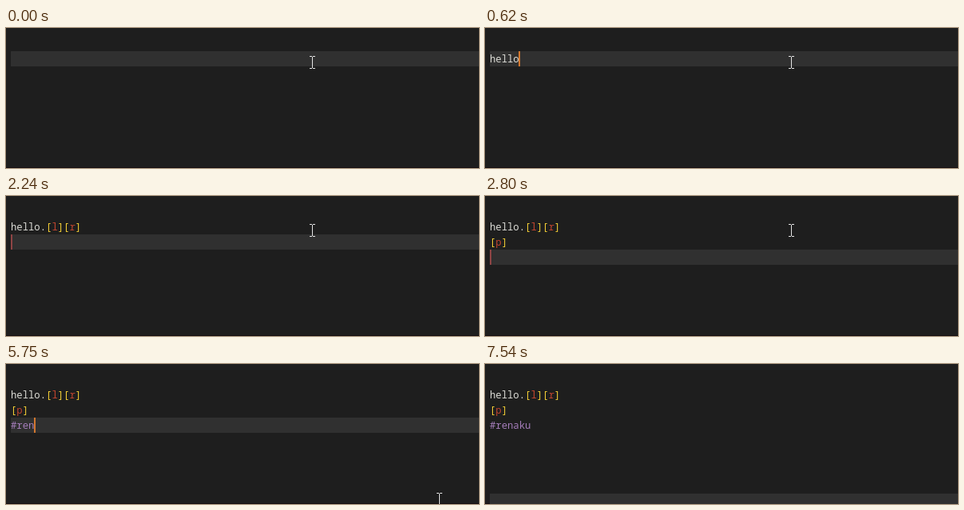
An HTML page with a canvas for the animation above (7700 ms loop, 592 by 175 pixels).

```html
<!DOCTYPE html>
<html lang="en">
<head>
<meta charset="utf-8">
<title>Editor typing</title>
<style>
html, body { margin: 0; width: 592px; height: 175px; overflow: hidden; background: #1e1e1e; }
canvas { display: block; }
</style>
</head>
<body>
<canvas id="stage" width="592" height="175"></canvas>
<script>
const ctx = document.getElementById('stage').getContext('2d');
const LOOP = 7700, LEFT = 6, TOP = 29, LINE = 19, PITCH = 7.34;
const ORANGE = '#e0812b', NAME = 'renaku';

const start = { text: ['', '', ''], row: 0, caret: false, match: null, popup: false, mouse: [383, 43] };
const steps = [];
const at = (time, change) => steps.push([time, change]);
// Replaces the text of a row and puts the caret behind it.
const type = (time, row, value, extra) => at(time, s => {
  s.text[row] = value;
  Object.assign(s, { row, caret: true, match: null, popup: false }, extra);
});
const set = (time, values) => at(time, s => Object.assign(s, values));

type(80, 0, 'h');
type(150, 0, 'he');
type(320, 0, 'hel');
type(400, 0, 'hell');
set(470, { popup: true });
type(620, 0, 'hello');
set(1080, { caret: false });
type(1400, 0, 'hello.');
type(1710, 0, 'hello.[l][r]');
set(1790, { match: [0, 9, 11] });
set(2090, { row: 1 });
set(2170, { match: null });
type(2400, 1, '[p]');
set(2480, { match: [1, 0, 2] });
type(2800, 2, '');
set(3260, { caret: false });
type(3640, 2, '#');
set(4190, { caret: false, mouse: [395, 51] });
set(4270, { mouse: [430, 70] });
set(4350, { mouse: [468, 92] });
set(4430, { mouse: [499, 110] });
type(4580, 2, '#s', { mouse: [528, 150] });
set(4670, { mouse: [542, 169] });
type(5200, 2, '#');
for (let i = 1; i <= NAME.length; i++) type(5440 + 80 * i, 2, '#' + NAME.slice(0, i));
set(6470, { caret: false });
set(6770, { caret: true, mouse: [549, 171] });
set(6850, { mouse: [555, 174] });
set(6930, { mouse: null });
set(7230, { row: 7, caret: true });
set(7540, { caret: false });

function rect(x, y, w, h, color) {
  ctx.fillStyle = color;
  ctx.fillRect(x, y, w, h);
}

function write(text, x, y, colorAt, boldAt = () => false) {
  [...text].forEach((char, i) => {
    ctx.font = `${boldAt(i) ? 'bold ' : ''}12.23px "Noto Sans Mono", monospace`;
    ctx.fillStyle = colorAt(i);
    ctx.fillText(char, x + i * PITCH, y);
  });
}

function writeCode(text, row) {
  write(text, LEFT, TOP + row * LINE + 14, i => {
    if (text[0] === '#') return '#a47dba';
    if ('[]'.includes(text[i])) return '#f5cf35';
    return text[i - 1] === '[' ? '#c3452f' : '#dcdcd6';
  });
}

function drawMatch([row, ...columns]) {
  ctx.lineWidth = 1;
  ctx.strokeStyle = '#85866f';
  for (const col of columns) {
    const x = Math.floor(LEFT + col * PITCH), y = TOP + row * LINE;
    rect(x, y, 8, LINE, '#2c382c');
    ctx.strokeRect(x + .5, y + .5, 7, LINE - 1);
  }
}

function drawIcon(x, y, color) {
  ctx.strokeStyle = color;
  ctx.lineWidth = 1.3;
  ctx.stroke(new Path2D(`M${x} ${y + 4.5}l4-4 3 2.5-4 4z
    m5 0h4m-2 0v5h2M${x + 9} ${y + 4.5}l2-2 2 2-2 2z
    m0 5l2-2 2 2-2 2z`));
}

function drawPopup() {
  rect(36, 48, 560, 42, '#454545');
  rect(37, 49, 556, 40, '#252526');
  rect(37, 49, 556, 19, '#707070');
  [['3d_hide_all', '#fff', '#fff'], ['chara_hide_all', '#c8c8c8', ORANGE]].forEach(([label, color, icon], i) => {
    const h = label.indexOf('hide');
    const hit = n => [h, h + 3, h + 6, h + 7].includes(n);
    drawIcon(40.5, 53 + i * LINE, icon);
    write(label, 59, 63 + i * LINE, n => hit(n) ? ORANGE : color, hit);
  });
}

function drawMouse([x, y]) {
  const color = '#e4e4e4';
  rect(x, y - 7, 1, 14, color);
  for (const end of [y - 8, y + 7]) {
    rect(x - 3, end, 3, 1, color);
    rect(x + 1, end, 3, 1, color);
  }
}

function draw(time) {
  const s = { ...start, text: [...start.text] };
  for (const [when, change] of steps) if (when <= time) change(s);

  rect(0, 0, 592, 175, '#1e1e1e');
  rect(0, 174, 592, 1, '#150e11');
  const y = TOP + s.row * LINE;
  rect(LEFT, y, 586, LINE, '#303030');
  if (s.match) drawMatch(s.match);
  s.text.forEach(writeCode);
  if (s.caret) {
    const col = (s.text[s.row] || '').length;
    rect(Math.floor(LEFT + col * PITCH), y, 2, LINE, col ? '#d2772f' : '#8f4444');
  }
  if (s.popup) drawPopup();
  if (s.mouse) drawMouse(s.mouse);
}

const origin = performance.now();
function tick() {
  draw((performance.now() - origin) % LOOP);
  requestAnimationFrame(tick);
}
tick();
</script>
</body>
</html>
```
